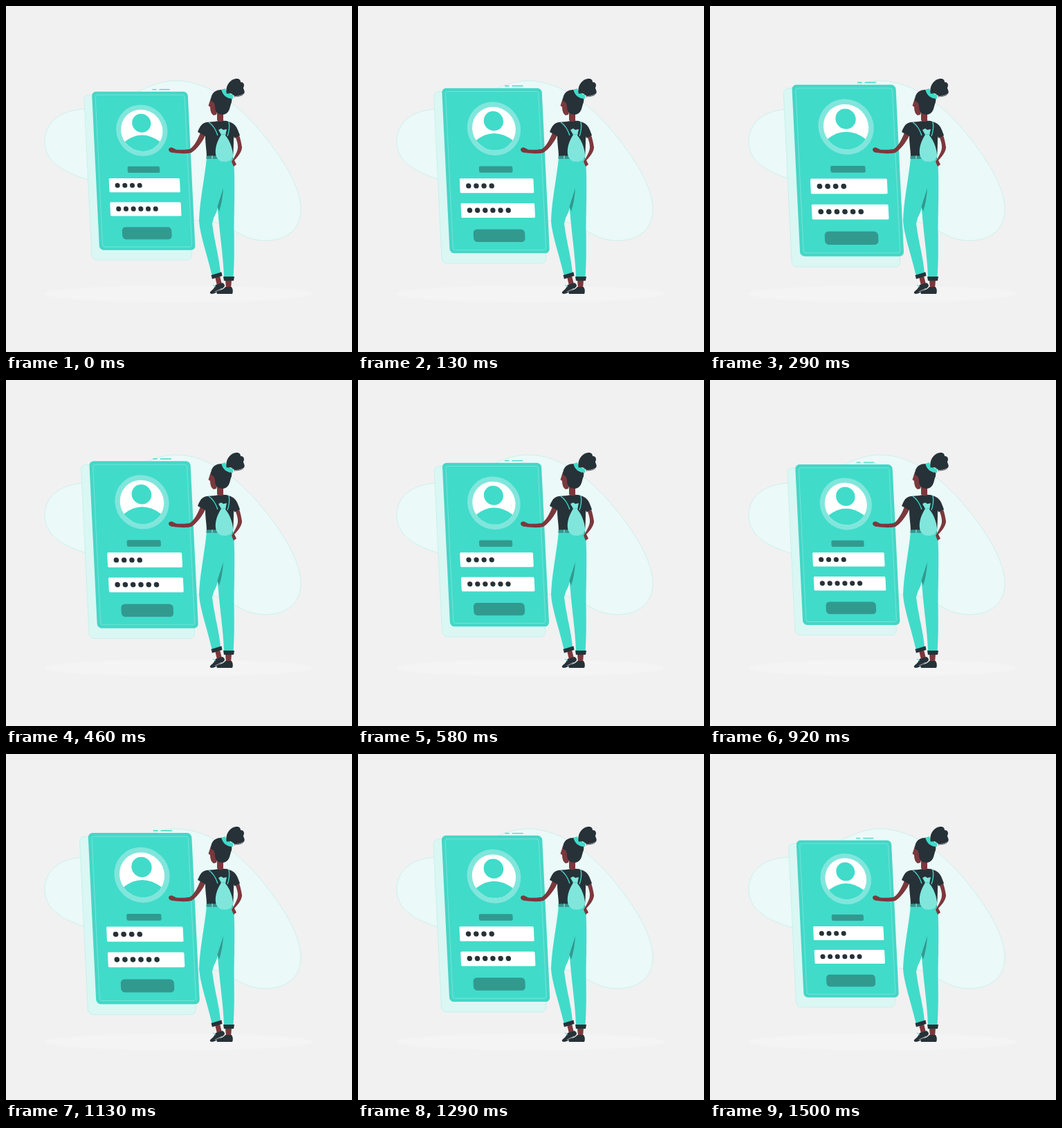
Animation, 500 px wide and 500 px high, one loop 1.54 s. Source, as an HTML page:

```html
<!DOCTYPE html>
<html lang="en">
<head>
<meta charset="utf-8">
<title>Login screen</title>
<style>
  html, body { margin: 0; height: 100%; overflow: hidden; background: #f1f1f1; }
  svg { display: block; width: 100%; height: 100%; }
  .teal { fill: #41dbca; }
  .deep { fill: #32998f; }
  .pale { fill: #80e6dc; }
  .dark { fill: #263238; }
  .skin { fill: #7b383c; }
  .white { fill: #fff; }
  .line { fill: none; stroke: #41dbca; }
</style>
</head>
<body>
<svg viewBox="0 0 500 500">
  <path fill="#ebf9f8" stroke="#9be6de" stroke-width=".4" d="M56 193C58 165 82 150 114 149C165 148 200 108 245 108C300 108 350 155 385 203C410 237 426 268 426 294C426 322 406 339 375 339C335 339 325 312 297 312C240 312 215 270 160 260C105 250 54 235 56 193Z"/>
  <ellipse cx="250" cy="416" rx="194" ry="12" fill="#f4f4f4"/>

  <g id="phone">
    <rect x="-74" y="-114" width="143" height="236" rx="7" fill="#daf7f4" stroke="#a5e9e2" stroke-width=".4"/>
    <path class="line" stroke-width="1.3" d="M24-121.6h6M34-121.6h15"/>
    <rect x="-62.5" y="-118.6" width="137" height="226.5" rx="6" fill="#45d6c6"/>
    <rect class="teal" x="-57.8" y="-114" width="127.6" height="217.4" rx="3" stroke="#90eae1" stroke-width=".6"/>
    <circle class="pale" cx="6.3" cy="-63" r="36.7"/>
    <circle class="white" cx="6.3" cy="-63" r="29.8"/>
    <circle class="teal" cx="6.3" cy="-73.5" r="13.4"/>
    <path class="teal" d="M-18.8-47Q6.3-66 31.4-47A29.8 29.8 0 0 1-18.8-47Z"/>
    <rect class="deep" x="-16.8" y="-11.6" width="46" height="9" rx="2"/>
    <rect class="white" x="-44.2" y="5.4" width="101.2" height="20" rx="1.5"/>
    <rect class="white" x="-44.2" y="39.4" width="101.2" height="19.8" rx="1.5"/>
    <g id="dots" class="dark"></g>
    <rect class="deep" x="-28.8" y="75.1" width="70.6" height="17.4" rx="5"/>
  </g>

  <g id="woman">
    <path class="skin" d="M302 391L309 390L312 402L305 404ZM317 396H326L325 408H318Z"/>
    <path class="dark" d="M303 403L313 400Q319 404 313 408C307 411 303 416 297 416Q293 415 296 412C300 409 301 407 303 403Z"/>
    <path class="dark" d="M317 406L326 406Q329 411 327 416L305 416Q303 413 308 411Q314 410 317 406Z"/>
    <path d="M302 413L312 408" stroke="#fff" stroke-width=".6"/>
    <path class="line" d="M299 403L303 406"/>
    <path class="teal" d="M290 219L329 221C331 250 330 280 329.5 320C330 350 330 372 328.5 392L315 392C314 360 308 325 306 292L304 298Q300 305 298 314C301 340 308 362 310 386L297.5 389C291 360 280 330 279 310C280 280 287 250 290 219Z"/>
    <path class="deep" d="M314 263L305.5 290L308 297Q313 282 314 263Z"/>
    <path class="dark" d="M296.5 389L311.5 384.5L312.5 390L298 394.5ZM314 391H330L329 397H315Z"/>
    <path class="skin" d="M281 183C277 194 270 205 265 207C257 208 250 208 246 207.5L240 204.5Q235 204 235 208Q236 212 242 212C250 213 260 214 268 212C276 207 284 196 288 187Z"/>
    <path class="skin" d="M331 188C336 200 336 206 333 212C331 217 328 221 326 225L329 232L333 229L330 223C336 217 341 210 341 204C340 198 339 193 337 187Z"/>
    <path class="dark" d="M302 167Q310 165 318 166C330 169 333 172 338 187L330 191L329 188Q329 206 328 219L290 218C290 208 288 200 288 188L277 182C281 172 284 169 290 168Z"/>
    <path class="deep" d="M289.5 216.5H328V221H289.5Z"/>
    <path d="M298 216V221" stroke="#fff" stroke-width=".7"/>
    <path class="skin" d="M305 153H314V166Q309 169 305 165Z"/>
    <path class="skin" d="M296 133L292.5 144L295 146Q295 155 300 158L304 157Q308 148 303 136Z"/>
    <path class="dark" d="M296 137C296 125 303 121 312 121C322 122 328 130 326 139C323 146 324 155 314 157C307 157 302 154 302 146C302 140 299 138 296 137Z"/>
    <path class="line" stroke-width="6" d="M314 120Q317 131 328 131"/>
    <path class="dark" d="M319 127C316 115 325 104 335 105Q339 106 339 110Q344 110 344 115Q343 118 343 119Q346 124 343 127C338 130 334 130 330 130Q324 124 319 127Z"/>
    <path d="M329 131Q346 131 344 123" fill="none" stroke="#263238" stroke-width=".7"/>
    <path class="line" stroke-width="1.4" d="M293 168Q301 173 306 187M322 167Q324 177 320 188"/>
    <path class="pale" d="M307 179L311 177L314 179L319 178L317 187C323 194 327 204 328 214C329 221 323 225 316 225C310 225 304 222 303 214C302 205 305 195 311 186Z"/>
    <path class="line" d="M310 185Q314 187 318 185"/>
  </g>
</svg>
<script>
const LOOP = 1540, FPS = 24;
// Pulse keys: [step, scale]
const KEYS = [[-0.8, 1], [6.3, 1.1], [20.2, 1], [27.6, 1.1], [36.2, 1]];
const phone = document.getElementById('phone');

const dotRow = (count, y) => Array.from({ length: count }, (_, i) =>
  `<circle cx="${-32.3 + i * 10.58}" cy="${y}" r="3.5"/>`).join('');
document.getElementById('dots').innerHTML = dotRow(4, 15.5) + dotRow(6, 49);

function pulse(step) {
  const next = Math.max(1, KEYS.findIndex(([at]) => at >= step));
  const [a, from] = KEYS[next - 1], [b, to] = KEYS[next];
  return from + (to - from) * (step - a) / (b - a);
}

function draw(now) {
  const step = Math.floor((now % LOOP) * FPS / 1000 + 0.1);
  phone.setAttribute('transform', `translate(193 243.6) scale(${pulse(step)}) skewX(2.78)`);
  requestAnimationFrame(draw);
}
draw(performance.now());
</script>
</body>
</html>
```
